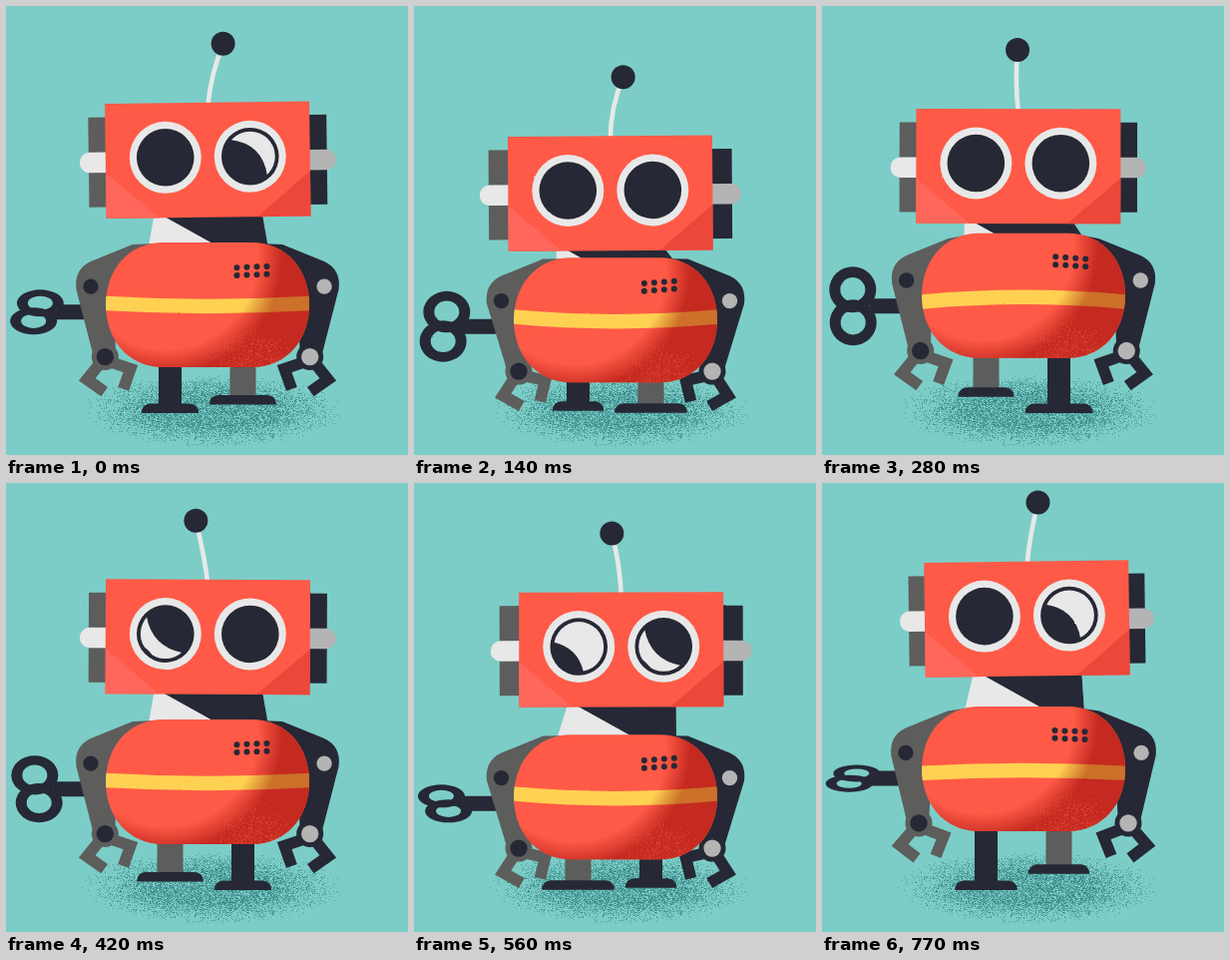
Animation, 403 px wide and 450 px high, one loop 0.84 s. Source, as an HTML page with a canvas:

```html
<!DOCTYPE html>
<html lang="en">
<head>
<meta charset="utf-8">
<title>Walking robot</title>
<style>
  html, body { margin: 0; width: 100%; height: 100%; overflow: hidden; background: #7ccdc7; }
  canvas { display: block; width: 403px; height: 450px; filter: url(#rough); }
  svg { position: absolute; width: 0; height: 0; }
</style>
</head>
<body>
<svg aria-hidden="true">
  <filter id="rough" x="0" y="0" width="100%" height="100%" color-interpolation-filters="sRGB">
    <feTurbulence type="fractalNoise" baseFrequency=".45" numOctaves="2" seed="4"/>
    <feDisplacementMap in="SourceGraphic" scale="1.4" xChannelSelector="R" yChannelSelector="G"/>
  </filter>
</svg>
<canvas id="stage" width="403" height="450"></canvas>
<script>
const ctx = document.getElementById('stage').getContext('2d');
const STEP = 70, STEPS = 12, MID = 202, TAU = Math.PI * 2, DEG = Math.PI / 180;
const C = {
  bg: '#7ccdc7', red: '#ff5a47', light: '#ff675c', deep: '#ec473b', navy: '#262835',
  grey: '#5d5d5c', silver: '#b4b4b4', white: '#e8e8e8', yellow: '#ffd152'
};

// Sine of the loop: `times` periods per loop, shifted by degrees.
const wave = (k, times, shift = 0) => Math.sin((k * 360 / STEPS * times + shift) * DEG);

// The body bobs twice per loop, the head sways once.
function poseAt(k) {
  const top = 239 + 17.9 * wave(k, 2, 8) + 5.8 * wave(k, 4, -51);
  const sag = 1 + 5.9 * wave(k, 2, 20);
  const sway = wave(k, 2, -25);
  return {
    top, sag, sway,
    shoulder: [85.7 + 1.8 * sway, top + 45.3 - .4 * sag],
    elbow: [101 + 4 * sway, top + 115.8 - .4 * sag],
    headX: 202.3 - 6.3 * wave(k, 1),
    headY: top - 78.4 + 12 * wave(k, 1) - 4.6 * wave(k, 2, 110),
    tilt: -.25 - .5 * wave(k, 1, 105),
    ball: 1.7 + 14.5 * wave(k, 1, 70),
    bend: -1.5 - 5 * wave(k, 1, 40)
  };
}

function random(seed) {
  return () => (seed = (seed * 16807) % 2147483647) / 2147483647;
}

// Cloud of one-pixel grains, fading towards the rim.
function grains(color, count, cx, cy, rx, ry, seed) {
  const c = document.createElement('canvas'), g = c.getContext('2d'), rnd = random(seed);
  c.width = 403;
  c.height = 450;
  g.fillStyle = color;
  for (let i = 0; i < count; i++) {
    const a = rnd() * TAU, d = (rnd() + rnd()) / 2;
    g.fillRect(Math.round(cx + Math.cos(a) * d * rx), Math.round(cy + Math.sin(a) * d * ry), 1, 1);
  }
  return c;
}
const shadow = grains('rgba(36,114,116,.4)', 9500, 207, 405, 132, 37, 71);
const speckle = grains('rgba(255,98,72,.35)', 600, 246, 112, 46, 30, 19);

function fill(color, path) {
  ctx.fillStyle = color;
  ctx.beginPath();
  path();
  ctx.fill();
}
function poly(color, ...pts) {
  fill(color, () => pts.forEach(p => ctx.lineTo(...p)));
}
function disc(color, x, y, r) {
  fill(color, () => ctx.arc(x, y, r, 0, TAU));
}
function box(color, x, y, w, h, r = 0) {
  fill(color, () => ctx.roundRect(x, y, w, h, r));
}
function line(color, width, path) {
  ctx.strokeStyle = color;
  ctx.lineWidth = width;
  ctx.beginPath();
  path();
  ctx.stroke();
}
function local(x, y, angle, draw) {
  ctx.save();
  ctx.translate(x, y);
  ctx.rotate(angle * DEG);
  draw();
  ctx.restore();
}

function windKey(k, { top, sag }) {
  const a = (k - 3.8) * TAU / 24, c = Math.cos(a), s = Math.sin(a);
  const y = top + 71 - .4 * sag, ry = 21 * Math.abs(c) + 2;
  box(C.navy, 48, y - 7.5, 60, 15);
  for (const d of [-1, 1]) {
    const cx = 31 + d * s * 4, cy = y + d * c * 16.5;
    fill(C.navy, () => {
      ctx.ellipse(cx, cy, 23.5, ry, 0, 0, TAU);
      ctx.ellipse(cx, cy, 12.5, ry * .53, 0, TAU, 0, true);
    });
  }
}

function leg(x, phase, top) {
  const dark = wave(phase, 1, 75) > 0;
  const w = 62 - 10.7 * wave(phase, 1, 27), half = dark ? 11.5 : 13;
  const y = 408 - 17.5 * Math.exp(-(((phase - 4.5) / 1.75) ** 2));
  box(dark ? C.navy : C.grey, x - half, top + 100, half * 2, y - top - 104);
  box(C.navy, x - w / 2, y - 9.5, w, 9.5, [9, 9, 1, 1]);
}

function arm({ top, sway, shoulder: [sx, sy], elbow: [ex, ey] }, color, dot) {
  fill(color, () => {
    ctx.moveTo(150, top + 1);
    ctx.lineTo(sx + 42, sy - 42);
    ctx.lineTo(sx, sy - 25);
    ctx.quadraticCurveTo(sx - 17, sy - 17, sx - 14.5, sy + 3);
    ctx.lineTo(ex - 11.5, ey);
    ctx.lineTo(ex + 10, ey);
    ctx.lineTo(sx + 26, sy + 20);
    ctx.lineTo(150, sy);
  });
  disc(color, ex, ey, 13.5);
  disc(dot, sx, sy, 7.7);
  local(ex, ey, -4 - 4 * sway, () => line(color, 11.5, () => {
    ctx.moveTo(-6, 7);
    ctx.lineTo(-19, 22);
    ctx.lineTo(-2, 35);
    ctx.moveTo(4, 5);
    ctx.lineTo(25, 13);
    ctx.lineTo(17, 33);
  }));
  disc(dot, ex, ey, 8.7);
}

function neck({ top, headX, headY }) {
  const y = headY + 56, b = top + 6, r = headX + 55, cut = headX - 45;
  poly(C.white, [headX - 54, y], [r, y], [263, b], [142.5, b]);
  poly(C.navy, [cut, y], [r, y], [263, b], [cut + 1.8 * (b - y), b]);
}

function shade(from, to) {
  const g = ctx.createRadialGradient(160, 15, 92, 160, 15, 117);
  g.addColorStop(0, from);
  g.addColorStop(1, to);
  return g;
}

function body({ top, sag }) {
  ctx.save();
  ctx.translate(0, top);
  ctx.beginPath();
  ctx.moveTo(158, 0);
  ctx.lineTo(246, 0);
  ctx.bezierCurveTo(282, 0, 304, 28, 304, 62.5);
  ctx.bezierCurveTo(304, 97, 282, 125, 246, 125);
  ctx.lineTo(158, 125);
  ctx.bezierCurveTo(122, 125, 100, 97, 100, 62.5);
  ctx.bezierCurveTo(100, 28, 122, 0, 158, 0);
  ctx.fillStyle = C.red;
  ctx.fill();
  ctx.clip();
  ctx.fillStyle = shade('rgba(196,42,32,0)', 'rgba(196,42,32,1)');
  ctx.fillRect(98, 0, 208, 126);
  ctx.drawImage(speckle, 0, 0);
  line(shade(C.yellow, '#cd7029'), 14.5, () => {
    ctx.moveTo(98, 64 - sag);
    ctx.quadraticCurveTo(MID, 64 + sag, 306, 64 - sag);
  });
  ctx.restore();
  for (let i = 0; i < 8; i++) {
    const col = i % 4, row = i >> 2;
    disc(C.navy, 232.5 - sag * .35 + col * 10, top + 24.6 + row * 7.8 - sag * .15 * (col - 1.5), 3);
  }
}

// A glint band crosses the pupil from lower left to upper right in five steps.
function eye(x, phase) {
  disc(C.white, x, -3, 36);
  disc(C.navy, x, -3, 28.8);
  if (phase < 0 || phase > 4) return;
  const lo = -24 + 8 * phase, hi = -10 + 25 * phase;
  local(x, -3, -45, () => {
    ctx.beginPath();
    ctx.arc(0, 0, 25, 0, TAU);
    ctx.clip();
    fill(C.white, () => {
      ctx.moveTo(lo - 10, -26);
      ctx.quadraticCurveTo(lo + 10, 0, lo - 10, 26);
      ctx.lineTo(hi + 9, 26);
      ctx.quadraticCurveTo(hi - 9, 0, hi + 9, -26);
    });
  });
}

function head(k, { headX, headY, sway, tilt, ball, bend }) {
  const ear = 120.2 + 1.8 * sway;
  local(headX, headY, 0, () => {
    line(C.white, 4.6, () => {
      ctx.moveTo(0, -54);
      ctx.quadraticCurveTo(ball / 2 + bend, -86, ball, -116);
    });
    disc(C.navy, ball, -116.5, 12);
  });
  local(headX, headY, tilt, () => {
    box(C.grey, -ear, -44, 40, 90);
    box(C.navy, ear - 40, -44, 40, 90);
    box(C.white, -ear - 9, -9, 60, 20.5, 10);
    box(C.silver, ear - 51, -9, 60, 20.5, 10);
    box(C.red, -102.5, -57.5, 205, 115);
    poly(C.light, [-102.5, 12], [-49, 57.5], [-102.5, 57.5]);
    poly(C.deep, [102.5, 12], [49, 57.5], [102.5, 57.5]);
    eye(-42.5, k - 6);
    eye(42.5, (k + 4) % STEPS);
  });
}

function draw(time) {
  const k = Math.floor(time / STEP) % STEPS, pose = poseAt(k);
  ctx.fillStyle = C.bg;
  ctx.fillRect(0, 0, 403, 450);
  ctx.drawImage(shadow, 0, 0);
  windKey(k, pose);
  leg(164.5, k, pose.top);
  leg(237.5, (k + 6) % STEPS, pose.top);
  neck(pose);
  arm(pose, C.grey, C.navy);
  ctx.save();
  ctx.translate(MID * 2, 0);
  ctx.scale(-1, 1);
  arm(pose, C.navy, C.silver);
  ctx.restore();
  body(pose);
  head(k, pose);
}

function loop() {
  draw(performance.now());
  requestAnimationFrame(loop);
}
loop();
</script>
</body>
</html>
```
